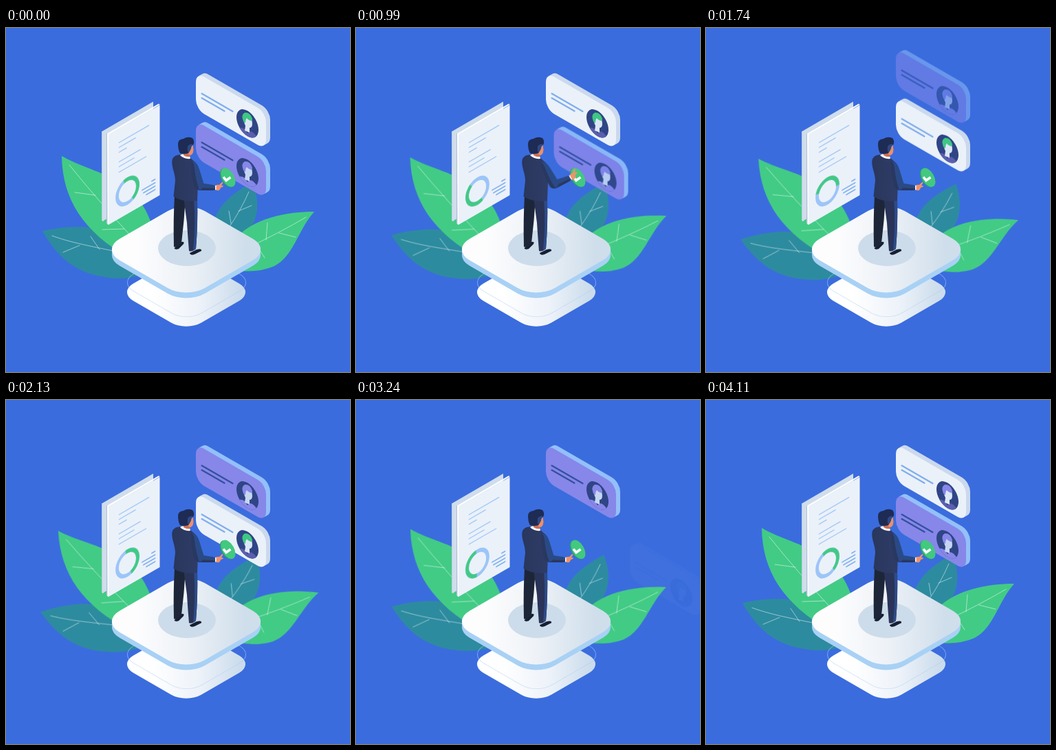
An HTML page without scripts for the animation above (4.14 s loop, 500 by 500 pixels).

```html
<!DOCTYPE html>
<html lang="en">
<head>
<meta charset="utf-8">
<title>Profile review</title>
<style>
  html, body { margin: 0; width: 100%; height: 100%; overflow: hidden; background: #3a6cde; }
  svg { display: block; width: 100vw; height: 100vh; }

  .leaf { animation: sway 4.14s cubic-bezier(.37, 0, .63, 1) infinite; }
  @keyframes sway { 50% { transform: rotate(var(--turn)); } }
  .vein { fill: none; stroke: #fff; stroke-opacity: .5; stroke-width: 1; stroke-linecap: round; }

  .ring { animation: spin 2.07s linear infinite; }
  @keyframes spin { to { transform: rotate(360deg); } }

  .card, .arm, .fore, .hair { animation: 4.14s cubic-bezier(.333, 0, .667, 1) infinite; }
  .violet { animation-name: violet; }
  .white { animation-name: white; }
  .arm { animation-name: reach; transform-origin: 274px 200px; }
  .fore { animation-name: bend; transform-origin: 281px 231px; }
  .hair { animation-name: hair; animation-timing-function: step-end; }

  @keyframes violet {
    0%, 21.74% { transform: translate(0, 71px); opacity: 1; }
    33.33% { transform: translate(123px, 142px); opacity: 0; }
    33.34% { transform: translate(0, -70px); opacity: 0; }
    50.36%, 78.99% { transform: none; opacity: 1; }
    96.01%, 100% { transform: translate(0, 71px); opacity: 1; }
  }
  @keyframes white {
    0%, 33.33% { transform: none; opacity: 1; }
    50.36%, 67.39% { transform: translate(0, 71px); opacity: 1; }
    78.98% { transform: translate(123px, 142px); opacity: .02; }
    78.99% { transform: translate(0, -70px); opacity: 0; }
    96.01%, 100% { transform: none; opacity: 1; }
  }
  @keyframes reach {
    0%, 8.45%, 27.29%, 54.11%, 72.95%, 100% { transform: none; }
    18.84%, 64.49% { transform: rotate(-42deg); }
  }
  @keyframes bend {
    0%, 8.45%, 28.99%, 54.11%, 74.64%, 100% { transform: none; }
    19.57%, 65.22% { transform: rotate(-11deg) scale(1.08); }
    23.91%, 69.57% { transform: rotate(-13deg) scale(1.08); }
  }
  @keyframes hair {
    0% { fill: #3fc783; }
    78.99%, 100% { fill: #8787e8; }
  }
</style>
</head>
<body>
<svg viewBox="0 0 500 500">
  <defs>
    <linearGradient id="top" x1="0" y1="1" x2="1" y2="0">
      <stop offset=".2" stop-color="#fdfdfe"/>
      <stop offset=".5" stop-color="#eef2f7"/>
      <stop offset=".85" stop-color="#cfdeeb"/>
    </linearGradient>
    <linearGradient id="low" x1="0" y1="1" x2="1" y2="0">
      <stop offset=".25" stop-color="#fff"/>
      <stop offset=".6" stop-color="#edf2f9"/>
      <stop offset=".9" stop-color="#cbdcec"/>
    </linearGradient>
    <linearGradient id="suit">
      <stop offset="0" stop-color="#29365d"/>
      <stop offset="1" stop-color="#2f3c66"/>
    </linearGradient>
    <rect id="slab" x="-71.5" y="-71.5" width="143" height="143" rx="31" transform="matrix(.866 .5 -.866 .5 0 0)"/>
    <rect id="base" x="-57" y="-57" width="114" height="114" rx="25" transform="matrix(.866 .5 -.866 .5 0 0)"/>
    <rect id="plate" width="102" height="54" rx="12" ry="14" transform="matrix(1 .577 0 1 276 64)"/>
    <g id="rim">
      <use href="#plate" x="6" y="-3.5"/>
      <use href="#plate" x="4" y="-2.3"/>
      <use href="#plate" x="2" y="-1.2"/>
    </g>
    <path id="lines" d="M284.5 95.3L329.5 121.3M284.5 101.8L317.5 120.8" fill="none" stroke-width="2.2" stroke-linecap="round"/>
    <clipPath id="disc"><circle r="18.5" transform="matrix(.866 .5 0 1 351 138.8)"/></clipPath>
    <circle id="dot" r="18.5" transform="matrix(.866 .5 0 1 351 138.8)"/>
    <path id="head" d="M346 129Q352 125 357 131L358 139Q358 145 354 145L354 152L347 149L348 142Q345 137 346 129Z"/>
    <path id="body" d="M336 146Q341 143 347 147L351 153L355 150Q363 152 367 164L350 165Q339 158 336 146Z"/>
    <path id="hairdo" d="M345 136Q341 126 347 123Q355 122 358 132L357 135Q352 134 350 131Q348 133 348 138Z"/>
  </defs>

  <rect width="500" height="500" fill="#3a6cde"/>

  <!-- leaves -->
  <g class="leaf" style="--turn:-5.6deg;transform-origin:185px 330px">
    <path fill="#2d8b9f" d="M53 295C85 288 118 286 142 295Q185 312 215 350Q196 364 160 364C105 360 77 337 53 295Z"/>
    <path class="vein" d="M67 302C100 314 135 319 188 331M83 326L107 316M123 303L136 322"/>
  </g>
  <g class="leaf" style="--turn:-2.2deg;transform-origin:190px 320px">
    <path fill="#42cb85" d="M81 186C104 200 140 208 170 228C196 246 210 272 217 305L180 335C112 296 82 249 81 186Z"/>
    <path class="vein" d="M92 199Q132 249 185 306M100 239L130 243M140 293L172 292"/>
  </g>
  <g class="leaf" style="--turn:3.5deg;transform-origin:315px 320px">
    <path fill="#2d8b9f" d="M358 224C330 240 306 257 300 290L310 318C352 309 379 276 358 224Z"/>
    <path class="vein" d="M353 238Q342 264 322 293M324 266L327 284M338 266L357 258"/>
  </g>
  <g class="leaf" style="--turn:7deg;transform-origin:345px 325px">
    <path fill="#42cb85" d="M448 267C410 267 358 275 330 310L330 352Q365 357 390 346C418 332 424 294 448 267Z"/>
    <path class="vein" d="M436 275Q397 298 350 320M380 283L378 308M397 298L421 304M363 314L376 334"/>
  </g>

  <!-- document -->
  <path fill="#b9c9de" d="M139 150L142 151V281L139 280Z"/>
  <path fill="#cfddec" d="M140 150L214 107V238L140 281Z"/>
  <path fill="#aebfd8" d="M146 153L149 155V286L146 284Z"/>
  <path fill="#fff" d="M147 153.500L222 110L223.500 111.500L149 155V286L147.500 285Z"/>
  <path fill="#ebf1f9" d="M149 155L223.500 112V243L149 286Z"/>
  <g transform="matrix(1 -.577 0 1 148 154)" fill="none" stroke="#a5cbf7" stroke-width="1.6" stroke-linecap="round">
    <path d="M16.500 22H59.500M16.500 29H40M16.500 36H27M16.500 50H47M16.500 57H38M16.500 65H55.500"/>
    <path stroke="#83b3f1" stroke-width="1.9" d="M64 105.500H68.500M50 110.500H68.500M52 115.500H68.500M56 120.500H68.500"/>
  </g>
  <g transform="matrix(.866 -.5 0 1 176.500 237)" fill="none" stroke-width="5.500">
    <circle r="17.300" stroke="#9cc5f8"/>
    <path class="ring" stroke="#42c985" d="M-6 -16.230A17.300 17.300 0 0 1 9 14.770"/>
  </g>

  <!-- platform -->
  <use href="#base" x="262" y="384" fill="url(#low)"/>
  <use href="#base" x="262.500" y="370" fill="none" stroke="#a9cdf3" stroke-opacity=".55" stroke-width=".9"/>
  <g fill="#a8d1f5">
    <use href="#slab" x="262" y="330"/>
    <use href="#slab" x="262" y="326"/>
  </g>
  <use href="#slab" x="262" y="322" fill="url(#top)"/>
  <ellipse cx="263" cy="320" rx="42" ry="26" fill="#cddcea"/>

  <!-- cards -->
  <g class="card violet">
    <use href="#rim" fill="#93c0fa"/>
    <use href="#plate" fill="#8687e9"/>
    <use href="#lines" stroke="#34509f"/>
    <use href="#dot" fill="#2f4585"/>
    <g clip-path="url(#disc)">
      <use href="#body" fill="#8687e9"/>
      <use href="#head" fill="#c5d6f3"/>
      <use href="#hairdo" fill="#8687e9"/>
    </g>
  </g>
  <g class="card white">
    <use href="#rim" fill="#cbd9ee"/>
    <use href="#plate" fill="#ebf1f9"/>
    <use href="#lines" stroke="#80aeed"/>
    <use href="#dot" fill="#2f4585"/>
    <g clip-path="url(#disc)">
      <use href="#body" fill="#5a5fae"/>
      <use href="#head" fill="#dce8f7"/>
      <use href="#hairdo" class="hair"/>
    </g>
  </g>

  <!-- button -->
  <g transform="matrix(.866 .5 0 1 321.500 217.800)">
    <circle r="12.300" fill="#2b9f73"/>
    <circle cx="1.600" cy="-1.300" r="12.200" fill="#42c97f"/>
  </g>
  <path d="M316 216.500L320 221.500L326.500 217" fill="none" stroke="#fff" stroke-width="3.600"/>

  <!-- man -->
  <path fill="#171f33" d="M244.500 320L255 311Q260 310 258 314L251 321Q246 323 244.500 320Z"/>
  <path fill="#171f33" d="M267 327L277 322Q285 320 284 324L274 329Q268 331 267 327Z"/>
  <path fill="#1d2638" d="M245 244L261 247Q259 280 255 313Q249 320 244 318Q243 280 245 244Z"/>
  <path fill="#2a3458" d="M258 246L278 249Q279 285 276 321Q270 326 266 324Q264 300 263 283Z"/>
  <path fill="#2c4b88" d="M273 249H278Q279 285 276 321L272 323Q276 285 273 249Z"/>
  <path fill="url(#suit)" d="M254 184Q245 184 242 190C239 200 246 210 246 222L243.500 245Q258 254 278 251L279 225Q282 204 276 196L268 189Z"/>
  <path fill="#fff" d="M253 185Q257 181 267 186L268 190Q259 191 253 185Z"/>
  <path fill="#c96f57" d="M258 178L268 180L267 187Q263 188 258 185Z"/>
  <path fill="#ef8e68" d="M264 167L271 167L272.500 177Q272 185 267 185Q262 182 264 167Z"/>
  <path fill="#1e2b54" d="M250 168Q250 162 258 161Q264 157 271 160Q275 164 272 170Q269 171 269 175Q267 179 265 182Q258 184 253 182Q250 177 250 168Z"/>
  <path fill="#2b4a85" d="M264 172Q267 168 272 169Q269 171 269 175Q267 179 265 182Q263 177 264 172Z"/>

  <g class="arm">
    <g class="fore">
      <path fill="#f0926c" d="M303 230Q307 227 310 228L314.500 223.500L315.500 225L313 229L316 229.500Q316 231 312 232Q311 237 307 236L303 235Z"/>
      <path fill="#fff" d="M302 228.500L305.500 229V235L302 235.500Z"/>
      <path fill="#2a4a86" d="M278 226L288 226L304 228.500V235.500Q290 236.500 280 235.500Q275 233 278 226Z"/>
      <path fill="#293860" d="M275 230Q286 233 304 233V235.500Q290 236.500 280 235.500Q275 234 275 230Z"/>
    </g>
    <path fill="#2a4a86" d="M269 194Q278 194 281 205L288 228Q287 235 280 235.500Q274 234 274 228Q270 212 269 194Z"/>
    <path fill="#293860" d="M269 194Q273 194 274 204Q276 222 281 235.500Q274 235 273 228Q269 212 269 194Z"/>
  </g>
</svg>
</body>
</html>
```
